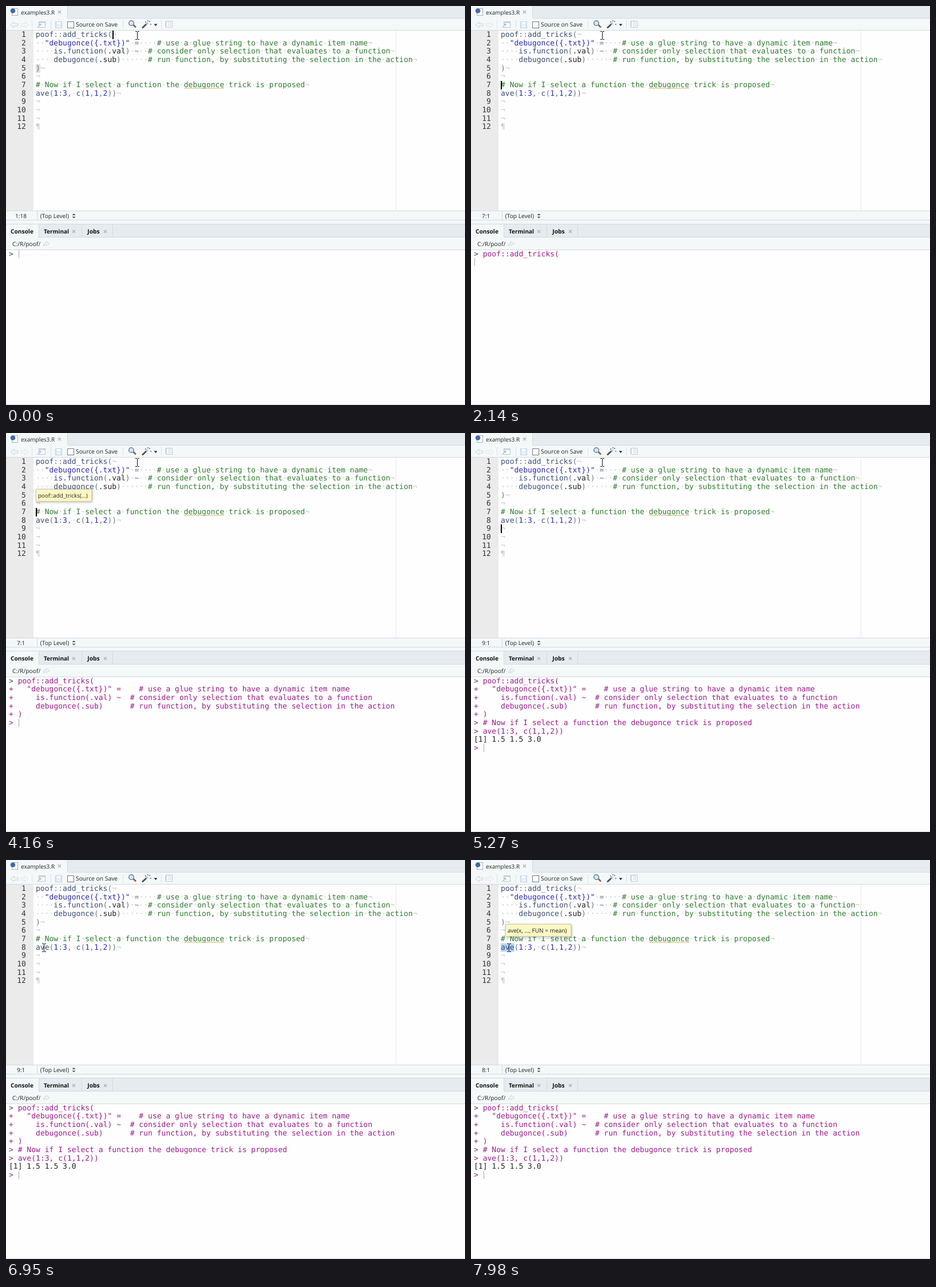
Recreate the animation shown at these times as an HTML page with a canvas. Size 802 by 698 pixels, loop 8 s.

```html
<!DOCTYPE html>
<html lang="en">
<head>
<meta charset="utf-8">
<title>Editor and console</title>
<style>
  html, body { margin: 0; width: 100%; height: 100%; overflow: hidden; background: #fefefe; }
  canvas { display: block; }
</style>
</head>
<body>
<canvas id="stage" width="802" height="698"></canvas>
<script>
const ctx = document.getElementById('stage').getContext('2d');
const LOOP = 8000, CHAR = 7.84, ROW = 14.68;
const CODE_X = 52, CODE_TOP = 43, CONSOLE_X = 5, CONSOLE_TOP = 426.5;
const MONO = '13px "DejaVu Sans Mono", monospace';
const UI = '"Open Sans", "Noto Sans", sans-serif';
const COL = {
  comment: '#2f7a2f', string: '#2a2aac', number: '#2c2cb8', call: '#3c4c72',
  name: '#222', op: '#687687', hidden: '#c4c4c4', input: '#991c88',
  panel: '#f4f8f9', strip: '#e6ebef', line: '#d3d9dd', text: '#222'
};

const code = [
  'poof::add_tricks(',
  '  "debugonce({.txt})" =    # use a glue string to have a dynamic item name',
  '    is.function(.val) ~  # consider only selection that evaluates to a function',
  '    debugonce(.sub)      # run function, by substituting the selection in the action',
  ')',
  '',
  '# Now if I select a function the debugonce trick is proposed',
  'ave(1:3, c(1,1,2))',
  '', '', '', ''
];
const log = code.slice(0, 5).map((s, i) => (i ? '+ ' : '> ') + s)
  .concat('> ' + code[6], '> ' + code[7], '[1] 1.5 1.5 3.0');

function rect(x, y, w, h, fill) {
  ctx.fillStyle = fill;
  ctx.fillRect(x, y, w, h);
}

function frame(x, y, w, h, stroke, fill) {
  if (fill) rect(x, y, w, h, fill);
  ctx.strokeStyle = stroke;
  ctx.lineWidth = 1;
  ctx.strokeRect(x + .5, y + .5, w - 1, h - 1);
}

function path(points, color, width, fill) {
  ctx.beginPath();
  points.forEach(([x, y], i) => i ? ctx.lineTo(x, y) : ctx.moveTo(x, y));
  if (fill) {
    ctx.fillStyle = color;
    ctx.fill();
  } else {
    ctx.strokeStyle = color;
    ctx.lineWidth = width;
    ctx.stroke();
  }
}

function disc(x, y, r, fill, stroke, width) {
  ctx.beginPath();
  ctx.arc(x, y, r, 0, 7);
  if (fill) { ctx.fillStyle = fill; ctx.fill(); }
  if (stroke) { ctx.strokeStyle = stroke; ctx.lineWidth = width; ctx.stroke(); }
}

function label(s, x, y, size = 10.2, color = COL.text, weight = 400) {
  ctx.font = `${weight} ${size}px ${UI}`;
  ctx.fillStyle = color;
  ctx.fillText(s, x, y);
}

// Monospaced text on a fixed character grid
function mono(s, x, y, color) {
  ctx.font = MONO;
  ctx.fillStyle = color;
  [...s].forEach((c, i) => c !== ' ' && ctx.fillText(c, x + i * CHAR, y));
}

function kind(token) {
  if (token[0] === '#') return 'comment';
  if (token[0] === '"') return 'string';
  if (/^\d/.test(token)) return 'number';
  return /^[\w.]/.test(token) ? 'name' : 'op';
}

function codeLine(s, row) {
  const y = CODE_TOP + 11 + row * ROW;
  mono(String(row + 1), row < 9 ? 27 : 19.2, y, '#333');
  for (const m of s.matchAll(/#.*|"[^"]*"|\d+|[\w.]+|\S/g)) {
    const next = s.slice(m.index + m[0].length);
    let k = kind(m[0]);
    if (k === 'name' && /^(\(|::)/.test(next)) k = 'call';
    mono(m[0], CODE_X + m.index * CHAR, y, COL[k]);
  }
  mono(s.replace(/\S/g, '\0').replace(/ /g, '·').replace(/\0/g, ' '), CODE_X, y, COL.hidden);
  mono(row === code.length - 1 ? '¶' : '¬', CODE_X + s.length * CHAR, y, COL.hidden);
}

function closeMark(x, y) {
  path([[x - 2.5, y - 2.5], [x + 2.5, y + 2.5]], '#adb3b8', 1.4);
  path([[x + 2.5, y - 2.5], [x - 2.5, y + 2.5]], '#adb3b8', 1.4);
}

function arrow(x, y, dir, color) {
  path([[x - 7 * dir, y], [x - dir, y - 5], [x - dir, y - 2], [x + 6 * dir, y - 2],
    [x + 6 * dir, y + 2], [x - dir, y + 2], [x - dir, y + 5], [x - 7 * dir, y]], color, 1);
}

function toolbar() {
  rect(0, 0, 802, 21, COL.strip);
  rect(0, 0, 107, 22, COL.panel);
  rect(107, 0, 1, 21, COL.line);
  rect(108, 21, 694, 1, COL.line);
  rect(0, 22, 802, 20, COL.panel);
  rect(0, 42, 802, 1, COL.line);
  frame(10, 4, 11, 13, '#a7b0b8', '#fff');
  disc(12, 8.5, 4.3, '#426aa5');
  label('examples3.R', 26, 14.5, 10);
  closeMark(93.5, 10.5);

  arrow(15, 33, 1, '#cbd1d5');
  arrow(32, 33, -1, '#dfe4e7');
  for (const x of [45, 78, 204, 271]) rect(x, 25, 1, 15, '#dce1e4');
  frame(57, 27, 12, 11, '#b9c5d0', '#fafcfd');
  rect(58, 28, 10, 2, '#cdd8e2');
  path([[54, 38], [61, 32], [58, 32], [61, 32], [61, 35]], '#9fb3c6', 1);
  frame(86, 27, 12, 12, '#bfd3e6', '#dde9f4');
  rect(89, 28, 6, 4, '#fff');
  rect(89, 34, 6, 4, '#f0f5fa');
  frame(107, 27, 12, 12, '#777', '#fff');
  label('Source on Save', 122, 36.3, 10.3);

  path([[222.5, 33], [227, 37.5]], '#8a6540', 2.6);
  disc(219, 30, 4.3, '#d5e8f8', '#637f9f', 1.5);
  path([[238, 38.5], [247, 30]], '#48505b', 2.8);
  path([[245, 32], [248, 29]], '#c3cbd5', 2.3);
  for (const [x, y] of [[243, 27], [250, 26], [252, 31], [247, 25]]) rect(x, y, 2, 2, '#7489a6');
  path([[258.5, 31.5], [264.5, 31.5], [261.5, 35]], '#222', 0, true);
  frame(279, 26, 12, 12, '#c0c9d0', '#fbfcfd');
  for (let y = 28; y < 37; y += 3) {
    rect(278, y, 3, 1, '#b1bcc5');
    rect(283, y, 6, 1, '#c9d1d8');
  }
}

function panes(status) {
  rect(0, 358, 802, 16, COL.panel);
  rect(0, 358, 802, 1, COL.line);
  rect(0, 374, 802, 1, COL.line);
  rect(0, 375, 802, 6, COL.panel);
  rect(54, 359, 1, 15, COL.line);
  label(status, status.length > 3 ? 16 : 19, 370.5, 10.1);
  label('(Top Level)', 59.7, 370.5);
  path([[115.5, 366], [121.5, 366], [118.5, 363]], '#555', 0, true);
  path([[115.5, 368.5], [121.5, 368.5], [118.5, 371.5]], '#555', 0, true);

  rect(0, 381, 802, 24, COL.strip);
  rect(0, 381, 802, 1, COL.line);
  rect(0, 404, 802, 1, COL.line);
  rect(0, 382, 57, 23, COL.panel);
  for (const x of [57, 132, 186]) rect(x, 382, 1, 22, COL.line);
  label('Console', 8, 398, 10.2, '#111', 700);
  label('Terminal', 66, 398, 10, '#111', 700);
  label('Jobs', 142.3, 398, 10.3, '#111', 700);
  closeMark(118.5, 394.5);
  closeMark(173.5, 394.5);
  rect(0, 405, 802, 21, COL.panel);
  rect(0, 426, 802, 1, COL.line);
  label('C:/R/poof/', 11, 420, 10.3);
  path([[66, 420], [66, 416], [70, 414], [70, 412], [76, 416], [70, 419], [70, 417], [66, 420]], '#cbd2d7', 1);
  rect(0, 697, 802, 1, COL.line);
}

function editor(t) {
  rect(0, 43, 48, 315, '#ebebeb');
  rect(681, 43, 1, 315, '#e8e8e8');
  if (t < 2140) rect(CODE_X, CODE_TOP + 4 * ROW, CHAR, 15, '#dedede');
  if (t >= 7180) rect(CODE_X, CODE_TOP + 7 * ROW, 3 * CHAR, ROW, '#b5d5ff');
  code.forEach(codeLine);
  const wave = [];
  for (let x = 311; x <= 382; x += 2) wave.push([x, 144 + (x % 4 === 1 ? 1 : -1) * .9]);
  path(wave, '#c8b060', 1);
}

function console_(t) {
  const full = t >= 5270, part = t >= 5180;
  const count = t < 2140 ? 0 : t < 2210 ? 1 : part ? (full ? 8 : 6) : 5;
  const busy = t >= 2140 && t < 2210 || part && !full;
  const base = i => CONSOLE_TOP + 11 + i * ROW;
  for (let i = 0; i < count; i++) {
    const prompt = i ? COL.input : '#444';
    const color = i === 7 ? '#222' : COL.input;
    if (i === 7) mono(log[i], CONSOLE_X, base(i), color);
    else {
      mono(log[i][0], CONSOLE_X, base(i), prompt);
      mono(log[i].slice(2), CONSOLE_X + 2 * CHAR, base(i), color);
    }
  }
  if (!busy) mono('>', CONSOLE_X, base(count), count ? COL.input : '#444');
  rect(busy ? 6 : 22, Math.round(CONSOLE_TOP + count * ROW), 1, 14, '#aaa');
}

// Times at which the caret toggles, starting visible
const blinks = [270, 670, 1300, 1660, 2760, 3240, 3770, 4160, 4800, 5180, 5890, 6290, 6780, 7040, 7910];

function caret(t) {
  if (blinks.filter(b => b <= t).length % 2) return;
  const [row, col] = t < 2140 ? [0, 17] : t < 5180 ? [6, 0] : t < 7040 ? [8, 0] : [7, t < 7180 ? 2 : 0];
  rect(Math.round(CODE_X + col * CHAR + .4), Math.round(CODE_TOP + row * ROW - .2), 2, 15, '#000');
}

function tip(s, x, y, w, size) {
  ctx.save();
  ctx.shadowColor = 'rgba(0,0,0,.3)';
  ctx.shadowBlur = 4;
  ctx.shadowOffsetX = ctx.shadowOffsetY = 1;
  rect(x, y, w, 22, '#fbf8c4');
  ctx.restore();
  frame(x, y, w, 22, '#d0cda8');
  label(s, x + 3.7, y + 14.5, size);
}

function pointer(t) {
  const step = Math.floor((Math.min(t, 6810) - 6050) / 76) + 1;
  const p = Math.max(0, Math.min(1, step / 11));
  const e = p * p * (3 - 2 * p);
  let x = 229 + (73 - 229) * e, y = 51 + (146 - 51) * e;
  if (t >= 6900) { x = 68; y = 152; }
  if (t >= 6950) { x = 66; y = 153; }
  x = Math.round(x);
  y = Math.round(y);
  rect(x, y - 6, 1, 13, '#111');
  for (const dy of [-7, 7]) {
    rect(x - 3, y + dy, 3, 1, '#111');
    rect(x + 1, y + dy, 3, 1, '#111');
  }
}

function draw(t) {
  rect(0, 0, 802, 698, '#fefefe');
  ctx.textRendering = 'geometricPrecision';
  toolbar();
  editor(t);
  panes(t < 2140 ? '1:18' : t < 5180 ? '7:1' : t < 7040 ? '9:1' : t < 7180 ? '8:3' : '8:1');
  console_(t);
  caret(t);
  if (t >= 3240 && t < 5180) tip('poof::add_tricks(...)', 52, 98, 98, 9.9);
  if (t >= 7980) tip('ave(x, ..., FUN = mean)', 60, 112, 115, 10.1);
  pointer(t);
}

const start = performance.now();
function tick() {
  draw((performance.now() - start) % LOOP);
  requestAnimationFrame(tick);
}
tick();
</script>
</body>
</html>
```
